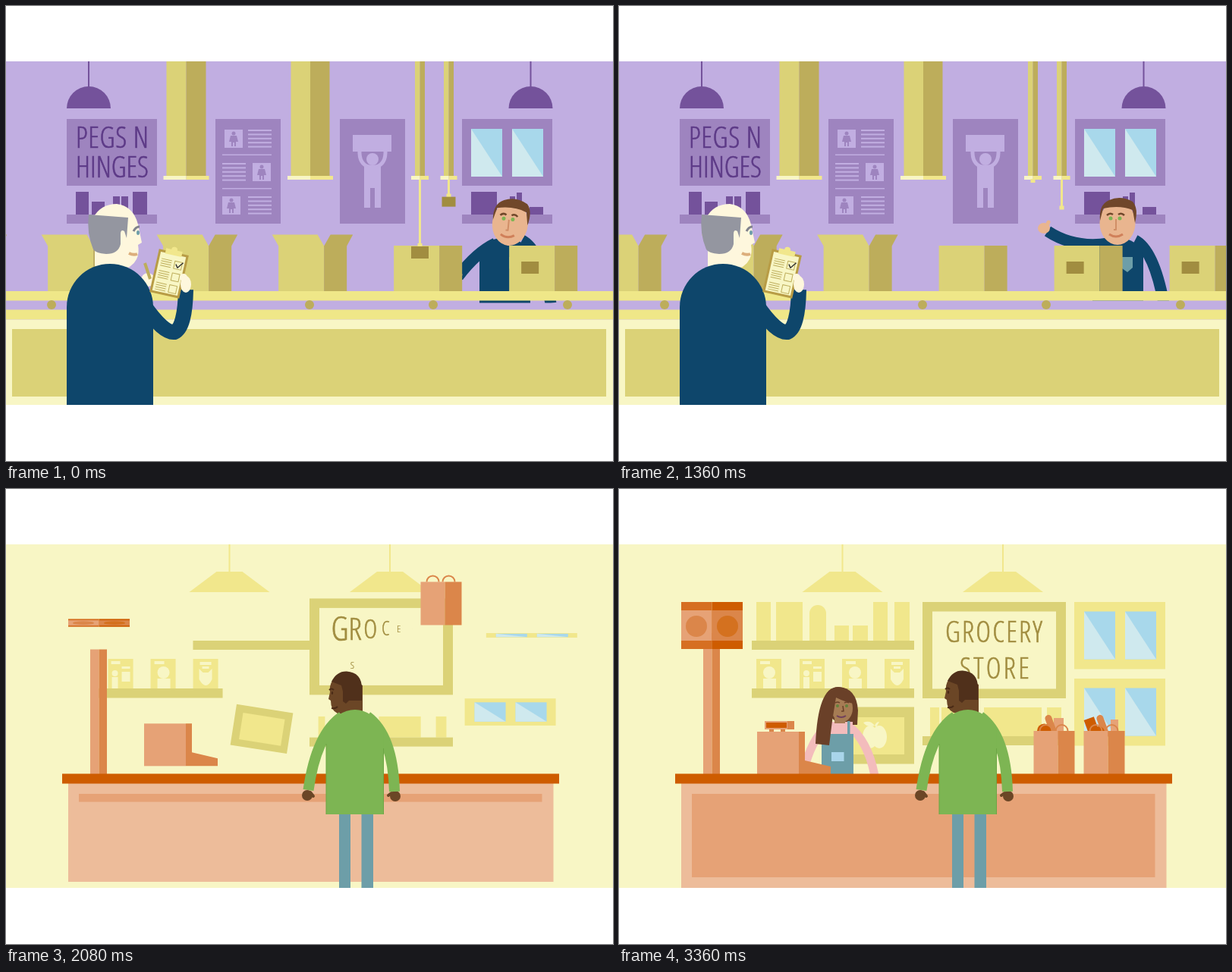
These frames come from a looping animation (800x600 px, 3400 ms). An HTML page with a canvas:

```html
<!DOCTYPE html>
<html lang="en">
<head>
<meta charset="utf-8">
<title>Shop scenes</title>
<style>
html, body { margin: 0; width: 100%; height: 100%; overflow: hidden; background: #fff }
canvas { display: block }
</style>
</head>
<body>
<canvas id="stage" width="800" height="600"></canvas>
<script>
const g = document.getElementById('stage').getContext('2d');
const LOOP = 3400, SPEED = .1577, GAP = 152;
const lilac = '#c1aee1', mauve = '#9e84bf', plum = '#74529b', ink = '#5d3a87',
  pale = '#f8f6c5', lemon = '#f1e78c', olive = '#dbd277', khaki = '#bdad5b', bronze = '#a18d40',
  navy = '#0e466b', cream = '#fef7dd', peach = '#e9b58f', teal = '#6d9ea8',
  rust = '#ce5c00', amber = '#db864a', salmon = '#e6a276', blush = '#edbc9a',
  green = '#7db553', brown = '#6b4626', dark = '#4a2b16', tan = '#a67c54', pink = '#f3bcbc';

// Drawing helpers; rectangles are given by two corners
function rect(c, x0, y0, x1, y1) { g.fillStyle = c; g.fillRect(x0, y0, x1 - x0, y1 - y0); }
function disc(c, x, y, r, ry = r) {
  g.fillStyle = c; g.beginPath(); g.ellipse(x, y, r, ry, 0, 0, 7); g.fill();
}
function fill(c, d) { g.fillStyle = c; g.fill(new Path2D(d)); }
function line(c, w, d, cap = 'butt') {
  g.strokeStyle = c; g.lineWidth = w; g.lineCap = cap; g.lineJoin = 'round'; g.stroke(new Path2D(d));
}
function group(x, y, draw, rot = 0, sx = 1, sy = sx) {
  if (!sx || !sy) return;
  g.save(); g.translate(x, y); g.rotate(rot); g.scale(sx, sy); draw(); g.restore();
}
function about(x, y, draw, rot, sx, sy) {
  group(x, y, () => group(-x, -y, draw), rot, sx, sy);
}

// Timing helpers
const part = (t, a, b) => Math.min(1, Math.max(0, (t - a) / (b - a)));
const out = (t, a, b) => 1 - (1 - part(t, a, b)) ** 2;
const mix = (a, b, k) => a + (b - a) * k;
const rush = (t, start, a = .01) => a * Math.max(0, t - start) ** 2;
function drop(t, start, dur, h) {
  const x = (t - start) / dur;
  if (x < 1) return -h * (1 - Math.max(0, x) ** 2);
  return -h * .03 * Math.sin(Math.PI * Math.min(1, (x - 1) * 2));
}
function pop(x, over = 1.15) {
  if (x <= 0) return 0;
  return x < 1 ? over * Math.sin(x * Math.PI / 2) : mix(over, 1, Math.min(1, x - 1));
}

// Lettering in the narrowest installed face, one character at a time
const widthIn = (font, text) => { g.font = font; return g.measureText(text).width; };
const faces = ['Roboto', 'Open Sans', 'Noto Sans', 'Lato', 'DejaVu Sans']
  .map(name => size => `300 extra-condensed ${size}px "${name}", sans-serif`)
  .sort((a, b) => widthIn(a(38), 'GROCERY') - widthIn(b(38), 'GROCERY'));
function lettering(text, x, y, room, c, grow = () => 1) {
  const face = faces[0];
  const size = Math.min(38, 38 * room / widthIn(face(38), text));
  const gap = (room - widthIn(face(size), text)) / (text.length - 1);
  g.textAlign = 'center'; g.textBaseline = 'alphabetic';
  [...text].forEach((ch, i) => {
    const w = g.measureText(ch).width;
    group(x + w / 2, y, () => {
      g.fillStyle = g.strokeStyle = c; g.lineWidth = .6;
      g.fillText(ch, 0, size * .355); g.strokeText(ch, 0, size * .355);
    }, 0, grow(i));
    x += w + gap;
  });
}

function panes(y) {
  for (const x of [613, 667]) {
    rect('#a8d8eb', x, y, x + 41, y + 63);
    fill('#cfe9ee', `M${x} ${y}L${x + 41} ${y + 63}H${x}Z`);
  }
}

// ---------- Packing hall ----------
function domeLamp(x, dy) {
  rect(plum, x - 1, 73, x + 1, 108 + dy);
  fill(plum, `M${x - 29} ${135 + dy}a29 29 0 0 1 58 0Z`);
}
function shelf(x, goods, k) {
  for (const [a, b, top] of goods) rect(plum, a, 275 - (275 - top) * k, b, 275);
  rect(mauve, x, 275, x + 119, 287);
}
function pictogram(x, y) {
  rect(lilac, x, y, x + 24, y + 24);
  disc(mauve, x + 12, y + 5, 2.5);
  fill(mauve, `M${x + 8} ${y + 8}h8l2 8h-3v6h-2v-5h-2v5h-2v-6h-3Z`);
}
function stripes(x, y) {
  for (let i = 0; i < 5; i++) rect(lilac, x, y + i * 5.4, x + 31, y + i * 5.4 + 2);
}
function posters() {
  rect(mauve, 276, 149, 362, 287);
  pictogram(288, 163); stripes(319, 163);
  pictogram(325, 207); stripes(285, 207);
  pictogram(285, 251); stripes(319, 251);
  rect(lilac, 285, 195.5, 350, 197); rect(lilac, 285, 240, 350, 241.5);
  rect(mauve, 440, 149, 526, 287);
  rect(lilac, 457, 170, 508, 192);
  disc(lilac, 483, 202, 8);
  line(lilac, 5, 'M466 190Q465 208 478 212H488Q501 208 500 190');
  rect(lilac, 472, 211, 494, 240);
  rect(lilac, 472, 239, 480, 266); rect(lilac, 486, 239, 494, 266);
}
function pipe(x, half, lip, dy) {
  rect(olive, x - half, 73, x, 224 + dy);
  rect(khaki, x, 73, x + half, 224 + dy);
  rect(pale, x - lip, 224 + dy, x, 229 + dy);
  rect(lemon, x, 224 + dy, x + lip, 229 + dy);
}
function carton(x) {
  const front = 15 * (1 - part(x, 364, 378)), side = 15 * (1 - part(x, 378, 392));
  rect(olive, x, 316, x + 60, 377);
  rect(khaki, x + 60, 316, x + 90, 377);
  fill(olive, `M${x} 316.5l-8.5 ${-front}h60l8.5 ${front}Z`);
  fill(khaki, `M${x + 60} 316.5l8.5 ${-side}h29.5l-8 ${side}Z`);
  if (x > 518) rect(bronze, x + 16, 337, x + 39, 353);
}
function pellets(ph, dy) {
  const head = 229 + (ph - 82.6) * 2.5;
  g.save(); g.beginPath(); g.rect(200, 229 + dy, 80, 130); g.clip();
  for (let r = 0; r < 6; r++) for (let c = 0; c < 6; c++) {
    const y = head - 5.5 - r * 14;
    if (y < 340) disc(pale, 216 + c * 8.1, y, 3, 5.5);
  }
  g.restore();
}
function plunger(ph, dy) {
  const len = ph < 130 ? 100 * out(ph, 95, 118) : 100 * (1 - part(ph, 130, 147));
  if (len <= 0) return;
  const y = 229 + dy, b = y + len;
  fill(khaki, `M386 ${y}H416V${b - 7}q0 7-7 7H393q-7 0-7-7Z`);
  rect(olive, 389, y, 398, b - 5);
  for (let x = 402; x < 415; x += 4) rect(bronze, x, y, x + 1.5, b - 7);
}
// A suction rod lowers a label, touches the box at phase "hit" and returns
function rod(x, ph, hit, w, h, dy, y0) {
  const p = ph > 110 ? ph - GAP : ph, base = 229 + dy;
  let tip = 232 + dy;
  const falling = p < hit;
  if (falling && p > hit - 55) {
    tip = p < 0 ? mix(232, y0, part(p, hit - 55, 0) ** 2) : mix(y0, 338, out(p, 0, hit));
  } else if (!falling) tip = mix(338, 232, part(p, hit, hit + 28)) + dy;
  rect(lemon, x - 1.5, base, x + 1.5, tip);
  rect(lemon, x - 3, tip - 4, x + 3, tip + 1);
  if (falling && tip > 235) rect(bronze, x - w / 2, tip, x + w / 2, tip + h);
}
function worker(t) {
  const k = out(t, 0, 420), sink = rush(t, 1526.5);
  group(0, sink, () => {
    line(navy, 15, `M645 313Q${mix(620, 600, k)} ${mix(325, 320, k)} ${mix(596, 565, k)} ${mix(357, 297, k)}`);
    group(mix(594, 561, k), mix(362, 292, k), () => {
      disc(peach, -1, 1, 8, 7);
      line(peach, 5, 'M2 0L5-7', 'round');
    });
    line(navy, 15, 'M680 309Q705 322 718 392');
    fill(navy, 'M624 392V322Q632 306 658 306T691 330V392Z');
    fill(teal, 'M663 331h14v14l-7 6-7-5Z');
    group(mix(6, 0, k), mix(1, 0, k), () => about(657, 300, () => {
      disc(peach, 657, 286, 23.5, 29);
      fill('#70472a', 'M634 283Q632 262 646 256Q661 249 677 258Q685 267 680 286L677 269Q660 262 638 267Z');
      disc(green, 648, 280, 2.5); disc(green, 660, 280, 2.5);
      line('#70472a', 2.5, 'M643 276Q647 272 651 275M658 275Q662 272 666 276');
      line('#d08e66', 2, 'M655 281V295H652');
      line('#d0805a', 3, 'M646 301Q655 307 664 301');
    }, mix(.1, 0, k)));
  });
}
function clerk(t) {
  const e = rush(t, 1480, 1 / 14400), bow = Math.min(e, 1.6);
  group(80 - 55 * e, 526 - 3 * Math.min(e, 1), () => group(-80, -526, () => {
    const away = part(t, 60, 320);
    if (away < 1) group(-34 * away, 18 * away, () => {
      disc(cream, 187, 361, 9);
      line(khaki, 4, 'M183 339L190 360');
    });
    about(138, 340, () => {
      fill(cream, 'M115 279Q125 261 146 261Q168 264 174 288L179 312L174 315Q176 326 172 334Q166 346 150 348L117 343V318Z');
      fill('#9496a0', 'M109 275L161 279L159 306L156 297Q151 294 151 301V314Q148 327 132 327Q118 326 115 321Q106 300 109 275Z');
      line('#80828c', 3, 'M168 297Q171 291 176 291');
      disc(teal, 174, 299, 2, 3);
      line('#dcae7c', 4, 'M162 326Q168 329 173 327');
    }, .18 * bow);
    line(navy, 20, 'M182 395Q208 432 222 430Q236 424 237 374');
    fill(navy, 'M80 540V397A57 57 0 0 1 194 397V540Z');
    group(215, 353, () => {
      rect('#b89c45', -20, -29, 20, 29);
      rect(pale, -17, -26, 17, 26);
      rect(lemon, -11, -32, 11, -25); disc(lemon, 0, -32, 4);
      for (let r = 0; r < 3; r++) {
        const y = -18 + r * 16;
        for (let i = 0; i < 4; i++) rect(khaki, -14, y + i * 3, 0, y + i * 3 + 1);
        line(khaki, 1, `M4 ${y}h10v10h-10Z`);
      }
      line('#333', 1.5, 'M6-14L9-10L15-18');
    }, .22 + .42 * Math.min(1, e));
    disc(cream, 237, 367, 7, 11);
    disc(cream, 234, 358, 5);
  }), .125 * bow);
}
function hall(t) {
  const ph = t * SPEED % GAP, up = s => -rush(t, s);
  const pipe1 = up(1568), pipe2 = up(1538), rod1 = up(1513), rod2 = up(1491);
  rect(lilac, 0, 73, 800, 527);
  domeLamp(109, up(1480)); domeLamp(691.5, up(1583));
  group(0, up(1590), () => {
    rect(mauve, 80, 149, 199, 237);
    lettering('PEGS N', 92, 174, 96, ink);
    lettering('HINGES', 92, 213, 96, ink);
    posters();
    rect(mauve, 601, 149, 720, 237);
    panes(162);
  });
  shelf(80, [[92, 109, 245], [113, 130, 258], [141, 150, 251], [152, 161, 251], [167, 186, 245]], 1 - .94 * part(t, 1470, 1595));
  shelf(601, [[613, 647, 245], [654, 662, 258], [664, 671, 251], [673, 680, 246], [690, 708, 265]], 1 - part(t, 1605, 1700));
  if (ph > 82) pellets(ph, pipe1);
  plunger(ph, pipe2);
  pipe(237.5, 26, 30, pipe1);
  pipe(401, 25.5, 30, pipe2);
  pipe(545.5, 6.5, 11.5, rod1);
  pipe(583.5, 6.5, 11, rod2);
  worker(t);
  for (let x = 55 - GAP + ph; x < 800; x += GAP) carton(x);
  if (t < 1490) {
    rod(545.5, ph, 7, 23, 16, rod1, 316);
    rod(583.5, ph, 44, 18, 13, rod2, 251);
  }
  const b1 = 376 + up(1570), b2 = 400.5 + up(1565);
  rect(lilac, 0, b1 + 12.5 + 3 * (1 - part(t, 0, 300)), 800, 414);
  rect('#efe788', 0, b1, 800, b1 + 12.5);
  const r = 6 * (1 - part(t, 1480, 1580));
  for (const x of [60, 400, 563, 740]) disc(khaki, x, 394, r);
  rect('#efe788', 0, b2, 800, b2 + 13);
  rect(pale, 0, 413.5 - 341 * part(t, 1605, 1750) ** 2, 800, 527);
  const inset = 8 + Math.min(392, rush(t, 1575));
  rect(olive, inset, 426, 799 - inset, 515);
  clerk(t);
}

// ---------- Grocery ----------
function shadeLamp(x, dy) {
  rect(lemon, x - 1, 73, x + 1, 110 + dy);
  fill(lemon, `M${x - 17} ${109 + dy}h34l36 27h-106Z`);
}
function card(x, kind) {
  rect(lemon, x, 224, x + 33, 263);
  if (kind == 1) {
    rect(pale, x + 4, 227, x + 16, 231); rect(pale, x + 18, 234, x + 29, 237);
    rect(pale, x + 18, 241, x + 29, 254); disc(pale, x + 9, 243, 4); rect(pale, x + 5, 248, x + 13, 263);
  } else if (kind == 3) {
    rect(pale, x + 9, 228, x + 24, 232); rect(pale, x + 12, 234, x + 21, 237);
    fill(pale, `M${x + 8} 237l5 5h7l5-5v14q-8 16-17 0Z`);
  } else {
    rect(pale, x + 5, 227, x + 18, 231);
    disc(pale, x + 17, 242, 8); rect(pale, x + 9, 250, x + 26, 263);
  }
}
function shelves(t) {
  const dx = 200 * (1 - out(t, 1900, 2350)) + 2.5 * Math.sin(Math.PI * part(t, 2350, 2610));
  const goods = [[181, 200, 149, 2380], [207, 242, 149, 2356], [284, 303, 180, 2230], [308, 328, 180, 2210], [335, 354, 149, 2230], [363, 383, 149, 2190]];
  for (const [a, b, top, s] of goods) {
    const d = drop(t, s, 210, 150);
    rect(lemon, a, top + d, b, 200 + d);
  }
  const d = drop(t, 2325, 200, 150);
  fill(lemon, `M251 ${200 + d}V${164 + d}a11 11 0 0 1 22 0V${200 + d}Z`);
  rect(olive, 175 + dx, 200, 389 + dx, 212);
  g.save(); g.beginPath(); g.rect(122, 73, 300, 300); g.clip();
  g.translate(-270 * (1 - out(t, 1860, 2440)), 0);
  const tilt = .15 * Math.sin(Math.PI * part(t, 2380, 2580));
  [181, 238, 294, 350].forEach((x, i) => about(x + 33, 263, () => card(x, i), tilt));
  rect(olive, 175, 263, 389, 275.5);
  g.restore();
}
function picture(t) {
  const k = out(t, 1900, 2400);
  group(337, mix(304, 325, k), () => {
    rect(olive, -52, -37.5, 52, 37.5);
    rect(lemon, -38, -24, 39, 25);
    const s = out(t, 2200, 2420);
    if (s) group(0, 0, () => {
      disc(pale, -6, 2, 10, 15); disc(pale, 6, 2, 10, 15);
      fill(pale, 'M-15-17Q-6-21 0-13Q-10-10-15-17ZM0-13Q2-18 6-18L2-11Z');
    }, 0, s);
  }, .38 * (1 - k) + .035 * part(t, 2300, 2480) * (1 - part(t, 2500, 2700)), mix(.35, 1, out(t, 1900, 2420)));
}
function board(t) {
  group(0, -220 * (1 - out(t, 1850, 2120)), () => {
    rect(olive, 400, 149, 589, 276);
    rect(pale, 413, 161.5, 576, 263.5);
    lettering('GROCERY', 430, 189, 128, bronze, i => pop((t - 1955 - 25 * i) / 130));
    lettering('STORE', 449, 237, 91, bronze, i => pop((t - 2055 - 75 * i) / 130));
  });
}
function windowFrame(y, dx, open) {
  group(dx, 0, () => about(660, y + 44, () => {
    rect(lemon, 600, y, 720, y + 88.5);
    panes(y + 12.5);
  }, 0, 1, open));
}
function sideShelf(t) {
  if (t < 1880) return;
  const k = out(t, 1880, 2300), dy = 3 * (1 - out(t, 2000, 2300));
  const grow = (a, b) => {
    const c = (a + b) / 2, w = (b - a) / 2 * k;
    rect(lemon, c - w, 326 + dy - 38 * k, c + w, 326 + dy);
  };
  grow(410, 422); grow(425, 470); grow(481, 557); grow(564, 583);
  const w = 94.5 * out(t, 1880, 2040);
  rect(olive, 494.5 - w, 326 + dy, 494.5 + w, 338 + dy);
}
function tower(t) {
  const top = mix(376, 190, out(t, 1850, 2200));
  rect(salmon, 111, top, 122.5, 376); rect(amber, 122.5, top, 133, 376);
  const k = out(t, 2058, 2320);
  about(122, 180 - 5 * (1 - k), () => {
    rect('#d66f22', 82, 149, 122.5, 211); rect(rust, 122.5, 149, 163, 211);
    rect(salmon, 82, 160, 122.5, 200); rect(amber, 122.5, 160, 163, 200);
    disc(amber, 102, 181, 14); disc('#d4711f', 143, 181, 14);
  }, 0, 1, k);
}
function till(t) {
  group(0, drop(t, 1900, 184, 330), () => {
    rect(salmon, 182, 320, 237, 376);
    fill(amber, 'M237 320H245V358L279 366V376H237Z');
  });
  group(0, drop(t, 2287, 194, 320), () => {
    rect(amber, 198, 316, 204, 320); rect(amber, 213, 316, 219, 320);
    rect(salmon, 192, 306, 231, 317); rect(amber, 222, 306, 231, 317);
    rect(rust, 194, 308, 221, 315);
  });
}
function bag(x, dy) {
  group(x, dy, () => {
    line(amber, 2, 'M8 319a8 8 0 0 1 16 0M29 319a8 8 0 0 1 16 0');
    rect(salmon, 0, 319, 32, 376); rect(amber, 32, 319, 54, 376);
  });
}
function bags(t) {
  const item = (start, draw) => group(0, drop(t, start, 180, 270), draw);
  const loaf = (x, y) => group(x, y, () => line(amber, 9, 'M0-6V16', 'round'), -.35);
  group(0, -4 * Math.sin(Math.PI * part(t, 2440, 2520)), () => {
    item(2270, () => rect(salmon, 573, 302, 586, 330));
    item(2250, () => loaf(568, 308));
  });
  item(2360, () => disc(rust, 560.5, 319, 9.5));
  bag(546.5, drop(t, 1960, 200, 310) - 4 * Math.sin(Math.PI * part(t, 2440, 2520)));
  item(2690, () => group(623, 313, () => rect(rust, -7, -11, 7, 14), -.35));
  item(2750, () => rect(salmon, 648, 304, 658, 330));
  item(2720, () => loaf(636, 308));
  item(2660, () => disc(rust, 632, 321, 8));
  bag(612.5, drop(t, 2420, 200, 310));
}
function cashier(t) {
  if (t < 2180) return;
  const k = out(t, 2500, 2760), rise = 130 * (1 - out(t, 2180, 2420));
  // The head tips to one side and straightens again
  const head = draw => group(mix(1, 0, k), mix(-4, 0, k), () => about(290, 310, draw, mix(-.13, 0, k)));
  g.save(); g.beginPath(); g.rect(200, 200, 200, 176); g.clip();
  g.translate(0, rise);
  line(pink, 11, `M278 312Q${mix(262, 258, k)} ${mix(315, 322, k)} ${mix(240, 246, k)} ${mix(327, 362, k)}`);
  line(pink, 11, `M303 313Q${mix(338, 328, k)} ${mix(328, 332, k)} ${mix(354, 337, k)} 378`);
  head(() => fill('#6a4028', 'M268 290Q270 262 289 261Q313 262 315 292L314 311H290Z'));
  rect(pink, 272, 307, 308, 330);
  rect(tan, 284, 296, 298, 309);
  rect(teal, 301, 306, 304.5, 326); rect(teal, 267, 323, 309, 377);
  rect('#a9d5ea', 280, 347, 296.5, 359);
  head(() => {
    disc(tan, 294, 289, 14, 18.5);
    disc('#63823c', 288, 286, 2); disc('#63823c', 300, 286, 2);
    line('#6a4028', 1.5, 'M285 282Q288 280 291 282M297 282Q300 280 303 282M295 286L296 293H293');
    line('#70405c', 2, 'M287 299Q293 303 299 299');
    fill('#6a4028', 'M259 336Q262 262 288 261Q308 262 313 284Q298 281 286 275L281 306L277 338Z');
  });
  g.restore();
}
function counter(t) {
  if (t < 1790) return;
  const bottom = 388 + 130 * out(t, 1850, 2080) + 8 * out(t, 2080, 2900);
  rect(blush, 82, 388, 721.5, bottom);
  rect(salmon, 96, 402, 706.5, 402 + 110 * out(t, 2050, 2680));
  const w = 327.5 * out(t, 1790, 1960);
  rect(rust, 401.5 - w, 375.5, 401.5 + w, 388.5);
}
function shopper(t) {
  const k = out(t, 2500, 2720);
  group(0, 300 * (1 - out(t, 1770, 2040)), () => {
    rect(teal, 439, 425, 454, 527); rect(teal, 468.5, 425, 484, 527);
    group(-4 * (1 - k), 1 - k, () => {
      fill(brown, 'M434 252Q430 258 431 267L429 276L432 278Q432 291 441 295L474 300V258L450 245Z');
      fill('#50301b', 'M433 253Q440 239 453 239.5Q473 241 473 262V278H456L452 282L448 279V266L446 258Z');
      line(dark, 2, 'M430 264Q433 261 436 264M433 288Q438 289 441 286');
      disc(dark, 434, 268, 1.2, 2);
    });
    disc(brown, 397, 404, 7); line(brown, 4, 'M401 400L405 405', 'round');
    disc(brown, 513, 405, 7); line(brown, 4, 'M508 401L504 404', 'round');
    line(green, 14, 'M443 300Q409 323 398.5 397M476 300Q510 325 512 399');
    fill(green, 'M422 429V318Q437 291 460 291Q482 291 497.5 318V429Z');
    line('#6ca545', 1, 'M422 336V429M497.5 342V429');
  });
}
function grocery(t) {
  rect(pale, 0, 73, 800, 527);
  const fall = -70 * (1 - out(t, 1770, 2010));
  shadeLamp(294.5, fall); shadeLamp(506, fall);
  shelves(t); picture(t); sideShelf(t); board(t);
  windowFrame(149, 72 * (1 - out(t, 1990, 2270)), pop((t - 2068) / 330, 1.1));
  windowFrame(250, 60 * (1 - out(t, 1900, 2150)), pop((t - 2010) / 280, 1.04));
  tower(t); cashier(t); till(t); bags(t); counter(t); shopper(t);
}

function frame(now) {
  const t = now % LOOP;
  g.fillStyle = '#fff'; g.fillRect(0, 0, 800, 600);
  g.save(); g.beginPath(); g.rect(0, 73, 800, 453); g.clip();
  (t < 1770 ? hall : grocery)(t);
  g.restore();
}
const begin = performance.now();
function tick() { frame(performance.now() - begin); requestAnimationFrame(tick); }
tick();
</script>
</body>
</html>
```
